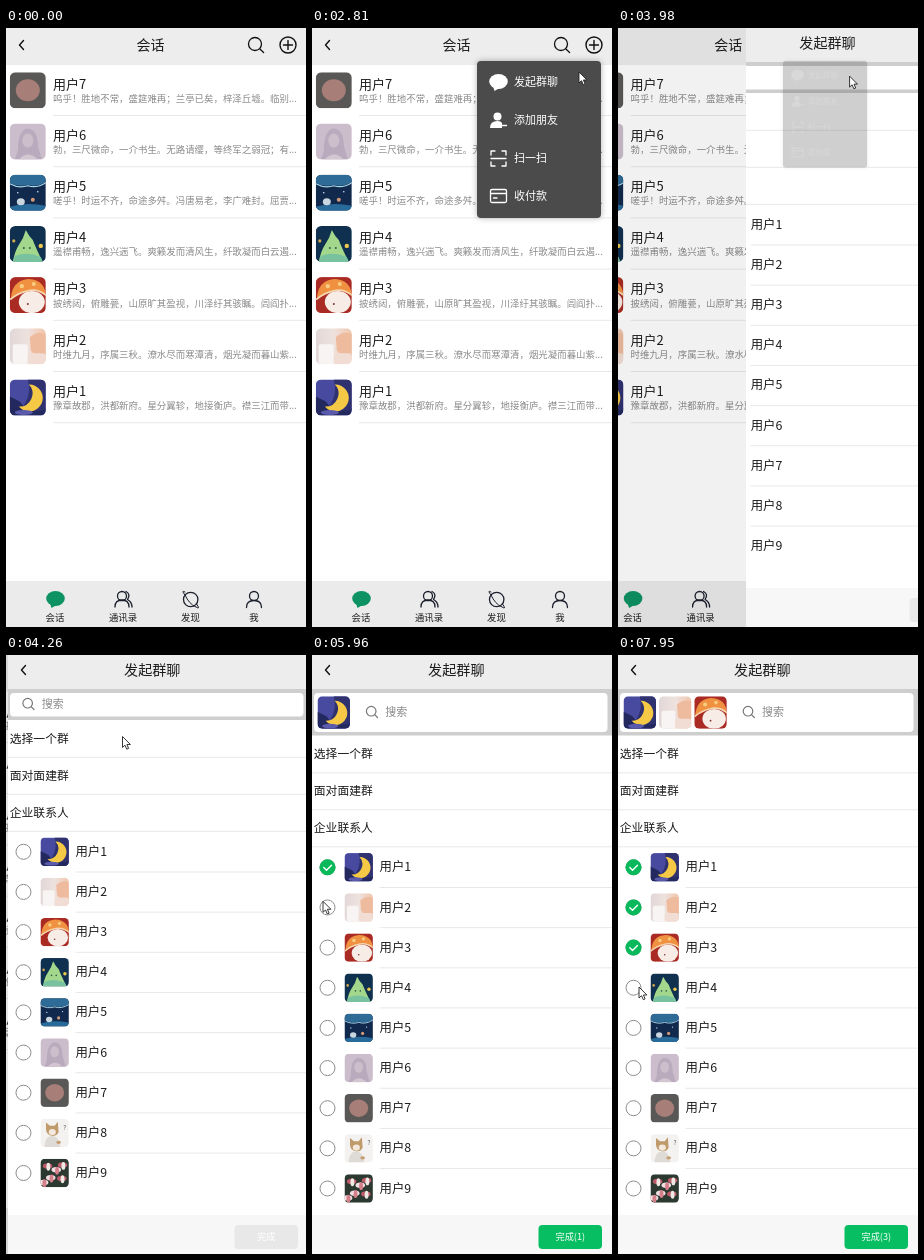
Recreate the animation shown at these times as an HTML page. Size 300x599 px, loop 8000 ms.

```html
<!DOCTYPE html>
<html lang="zh-CN">
<head>
<meta charset="utf-8">
<title>会话</title>
<style>
html, body { margin: 0; width: 100%; height: 100%; overflow: hidden; background: #fff; }
svg { display: block; width: 300px; height: 599px; }
text { font-family: "Noto Sans CJK SC", "Noto Sans CJK", "Noto Sans", sans-serif; white-space: pre; }
</style>
</head>
<body>
<svg id="stage" viewBox="0 0 300 599" width="300" height="599"></svg>
<script>
const LOOP = 8000, PITCH = 40.15;
const stage = document.getElementById('stage');
const $ = id => document.getElementById(id);

const rect = (x, y, w, h, fill, r = 0) => `<rect x="${x}" y="${y}" width="${w}" height="${h}" rx="${r}" fill="${fill}"/>`;
const circle = (x, y, r, fill) => `<circle cx="${x}" cy="${y}" r="${r}" fill="${fill}"/>`;
const oval = (x, y, a, b, fill) => `<ellipse cx="${x}" cy="${y}" rx="${a}" ry="${b}" fill="${fill}"/>`;
const shape = (d, fill) => `<path d="${d}" fill="${fill}"/>`;
const stroke = (d, color, w = 1.3) =>
  `<path d="${d}" fill="none" stroke="${color}" stroke-width="${w}" stroke-linecap="round" stroke-linejoin="round"/>`;
const rule = (x, y) => rect(x, y - .5, 300 - x, 1, '#e8e8e8');
// y is the middle of the glyphs
const label = (x, y, size, str, fill = '#1c1c1c', anchor = 'start') =>
  `<text x="${x}" y="${y + size * .375}" font-size="${size}" fill="${fill}" text-anchor="${anchor}">${str}</text>`;
const lens = (x, y, r, color, w) =>
  stroke(`M${x - r} ${y}a${r} ${r} 0 1 0 ${2 * r} 0a${r} ${r} 0 1 0 ${-2 * r} 0M${x + r * .72} ${y + r * .72}l${r * .6} ${r * .6}`, color, w);
const back = y => stroke(`M17.5 ${y - 4.5}L13.5 ${y}L17.5 ${y + 4.5}`, '#111', 1.4);
const bubble = (x, y, fill) =>
  oval(x, y, 9.3, 7.5, fill) + shape(`M${x - 6} ${y + 3}L${x - 4} ${y + 9.5}L${x + 2} ${y + 6}Z`, fill);

// Avatars on a 36 x 36 field
const avatars = [
  rect(0, 0, 36, 36, '#474a9f') + shape('M0 17L10 22L18 32L36 29V36H0Z', '#23285f') + shape('M18 0H36V30Q24 34 14 26Q22 14 18 0Z', '#30316f') +
    shape('M19 5A13.5 13.5 0 1 1 9 27A13 13 0 0 0 19 5Z', '#f5c945') + oval(14, 33, 9, 2.5, '#5a5bac'),
  rect(0, 0, 36, 36, 'url(#blush)') + rect(3, 16, 15, 20, '#f7f4f3', 2) + shape('M20 9Q28 2 36 6V27Q26 30 21 22Z', '#eebb9f') +
    rect(18, 25, 18, 11, '#f1ddd3', 3),
  rect(0, 0, 36, 36, '#a92b23') + oval(22, 25, 13, 11, '#f8ece6') +
    shape('M1 22Q2 3 19 2Q35 3 36 18Q27 11 17 14Q8 16 1 22Z', '#ef9140') + stroke('M1 22Q8 16 17 14Q27 11 36 18', '#f6d6b0', 1.8) +
    circle(12, 9, 2.2, '#f8cd80') + circle(24, 7, 2, '#f8cd80') + circle(18, 27, 1, '#7a3530'),
  rect(0, 0, 36, 36, '#10304f') + shape('M16 4Q19 10 23 14Q26 22 33 36H3Q5 25 9 19Q14 12 16 4Z', '#a3d88c') +
    shape('M5 30Q18 25 31 31L33 36H3Z', '#78c2a0') +
    circle(31, 20, 2.2, '#ecc850') + circle(4, 15, 1.6, '#d2a94b') + circle(14, 22, 1, '#315d4b') + circle(20, 22, 1, '#315d4b'),
  rect(0, 0, 36, 36, '#10294c') + shape('M0 0H36V7Q27 13 18 10Q8 13 0 8Z', '#2e6b96') + stroke('M0 9Q9 14 18 11Q27 14 36 8', '#a9d5e8', 1.2) +
    shape('M0 32Q16 27 36 31V36H0Z', '#286b9b') + oval(11, 27, 4, 3.5, '#c9d6df') + circle(23, 25, 2, '#d49a78') +
    circle(8, 18, .8, '#d7e9ff') + circle(28, 17, .8, '#d7e9ff'),
  rect(0, 0, 36, 36, '#cbbdcb') + shape('M8 28Q8 6 18 5Q28 6 28 22L32 36H5Z', '#b9aabd') + oval(18, 17, 5.5, 7, '#cdbecb') +
    shape('M9 36Q18 26 28 36Z', '#d3c6d1'),
  rect(0, 0, 36, 36, '#5a5856') + oval(18, 18, 12, 11, '#a87f78'),
  rect(0, 0, 36, 36, '#f4f2f0') + shape('M7 5L12 9H18L22 4L23 17Q21 22 15 22Q8 21 7 14Z', '#bf9a6b') + oval(15, 17, 4.5, 4, '#f3e8db') +
    shape('M5 36Q6 21 15 22Q24 22 25 36Z', '#dedad6') + label(29, 11, 8, '?', '#555') + oval(23, 30, 3, 2, '#c79e72'),
  rect(0, 0, 36, 36, '#2c3930') + [[9, 9], [20, 14], [28, 8], [13, 24], [27, 25], [4, 30]].map(([x, y], i) =>
    oval(x, y, 6, 3.5, i % 2 ? '#f1dfe2' : '#ba5968') + oval(x + 1, y + 1, 2.5, 5, i % 2 ? '#d57f8b' : '#eee9e4')).join('')
];
const avatar = (n, x, y, size) => `<use href="#av${n}" transform="translate(${x} ${y}) scale(${size / 36})"/>`;

const previews = [
  '豫章故郡，洪都新府。星分翼轸，地接衡庐。襟三江而带',
  '时维九月，序属三秋。潦水尽而寒潭清，烟光凝而暮山紫',
  '披绣闼，俯雕甍，山原旷其盈视，川泽纡其骇瞩。闾阎扑',
  '遥襟甫畅，逸兴遄飞。爽籁发而清风生，纤歌凝而白云遏',
  '嗟乎！时运不齐，命途多舛。冯唐易老，李广难封。屈贾',
  '勃，三尺微命，一介书生。无路请缨，等终军之弱冠；有',
  '呜乎！胜地不常，盛筵难再；兰亭已矣，梓泽丘墟。临别'
];

function chatPage() {
  let s = rect(0, 0, 300, 599, '#fff') + rect(0, 0, 300, 37, '#ededed') + back(17) +
    label(144.6, 16.8, 14, '会话', '#1c1c1c', 'middle') + lens(249, 16, 6.5, '#111', 1.3) +
    `<circle cx="282" cy="17" r="8" fill="none" stroke="#111" stroke-width="1.4"/>` + stroke('M277.500 17H286.500M282 12.500V21.500', '#111', 1.4);
  for (let i = 0; i < 7; i++) {
    const n = 7 - i, y = 51.2 * i;
    s += avatar(n, 3.8, 44.3 + y, 36) + label(47, 55.7 + y, 13, '用户' + n) +
      label(47, 70.2 + y, 9.45, previews[n - 1] + '...', '#8a8a8a') + rule(47, 87.5 + y);
  }
  s += rect(0, 553, 300, 46, '#ebebeb') + bubble(49.5, 570.5, '#0d9263');
  s += stroke('M109 579Q109 572 116 572Q123 572 123 579M111.500 568a4.500 4.500 0 1 0 9 0a4.500 4.500 0 1 0 -9 0M120 563.500Q125 566 121.500 571.500Q126 574 126 579', '#1b1f2b');
  s += stroke('M177.500 571.500a7.200 7.200 0 1 0 14.400 0a7.200 7.200 0 1 0 -14.400 0', '#1b1f2b') +
    stroke('M179 567Q174.500 561.500 179 564M190.500 576Q195 582 190 579Q183 576 179 567', '#1b1f2b', 1);
  s += stroke('M240.500 579.500Q240.500 572.500 248 572.500Q255.500 572.500 255.500 579.500M243.500 568a4.500 4.500 0 1 0 9 0a4.500 4.500 0 1 0 -9 0', '#1b1f2b');
  [[49, '会话'], [117, '通讯录'], [184.5, '发现'], [248, '我']].forEach(([x, t]) => s += label(x, 589.5, 9.4, t, '#1c1c1c', 'middle'));
  return s + `<rect id="dim" width="300" height="599" opacity="0"/>`;
}

function groupPage() {
  let list = '';
  ['选择一个群', '面对面建群', '企业联系人'].forEach((t, i) =>
    list += label(1.8, 83.3 + 37 * i, 11.8, t) + rule(0, 102.3 + 37 * i));
  for (let i = 0; i < 9; i++) {
    const y = 196.8 + PITCH * i;
    list += `<circle cx="15.500" cy="${y}" r="7.500" fill="#fff" stroke="#8c8c8c"/>`;
    if (i < 3) list += `<g id="tick${i}">${circle(15.5, y, 8, '#07b95b')}${stroke(`M11.800 ${y + .2}l2.700 2.700l5 -5`, '#fff', 1.4)}</g>`;
    list += avatar(i + 1, 32.5, y - 14.2, 28.4) + label(67.5, y - .6, 12.4, '用户' + (i + 1));
    if (i < 8) list += rule(67.5, y + 20.2);
  }
  return rect(0, 0, 300, 599, '#fff') + rect(0, 0, 300, 34, '#ededed') + back(15) +
    label(144.3, 14.8, 14.1, '发起群聊', '#1c1c1c', 'middle') +
    `<rect id="band" y="34" width="300" fill="#cecece"/><rect id="field" x="2" y="38" width="293.500" rx="4" fill="#fff"/>` +
    [0, 1, 2].map(i => `<g id="pick${i}">${avatar(i + 1, 5.5 + 35.4 * i, 41.3, 32.5)}</g>`).join('') +
    `<g id="hint">${lens(-.8, -.8, 4.8, '#777', 1.2)}${label(13.3, 0, 11, '搜索', '#8a8a8a')}</g>` +
    `<g id="list">${list}</g>` + rect(0, 560, 300, 39, '#f7f7f7') +
    `<rect id="btn" x="226.500" y="570" width="63.500" height="24" rx="4"/>` +
    `<text id="done" x="258.300" y="585" font-size="9.200" fill="#fff" text-anchor="middle"></text>`;
}

function menuPanel() {
  const w = '#fff';
  const items = bubble(21.5, 20.5, w) +
    circle(20.5, 55.5, 4, w) + shape('M13 67Q13 60 20.500 60Q24 60 25 62V67Z', w) + stroke('M24 64.500H29.500', w, 1.4) +
    stroke('M14 94V90H18M25 90H29V94M29 101V105H25M18 105H14V101M14 97.500H29', w) +
    stroke('M15 128.500H28Q29.500 128.500 29.500 130V140Q29.500 141.500 28 141.500H15Q13.500 141.500 13.500 140V130Q13.500 128.500 15 128.500ZM13.500 132.500H29.500M16.500 137H20', w) +
    ['发起群聊', '添加朋友', '扫一扫', '收付款'].map((t, i) => label(37, 21.2 + 38 * i, 11, t, w)).join('');
  return `<g filter="url(#soft)">${rect(0, 0, 124, 157, '#000', 4)}</g>` + rect(0, 0, 124, 157, '#4b4b4b', 4) +
    `<g id="items">${items}</g>`;
}

stage.innerHTML = `<defs>
  <linearGradient id="blush"><stop offset="0" stop-color="#e2d7d8"/><stop offset=".5" stop-color="#eee2de"/><stop offset="1" stop-color="#f0c5ac"/></linearGradient>
  <filter id="soft" x="-20%" y="-20%" width="140%" height="140%"><feGaussianBlur stdDeviation="3"/><feComponentTransfer><feFuncA type="linear" slope=".3"/></feComponentTransfer></filter>
  <clipPath id="round"><rect width="36" height="36" rx="5.500"/></clipPath>
  <clipPath id="wipe"><rect id="edge" width="600" height="599"/></clipPath>
  ${avatars.map((a, i) => `<g id="av${i + 1}" clip-path="url(#round)">${a}</g>`).join('')}
</defs>
<g id="chats">${chatPage()}</g>
<g id="cover" clip-path="url(#wipe)"><g id="group">${groupPage()}</g></g>
<g id="menu">${menuPanel()}</g>
<path id="cursor" d="M0 0V11L2.500 8.700L4.300 12.700L6.100 11.900L4.400 8H7.900Z" fill="#fff" stroke="#222" stroke-width=".9" stroke-linejoin="round"/>`;

// time, x, y
const track = [
  [350, 230, 470], [420, 170, 300], [490, 90, 110], [560, 33, 3], [760, 32, 2], [1000, 14, 12], [1250, 17, 32],
  [1510, 31, 50], [1580, 36, 52], [1720, 155, 55], [1860, 262, 36], [2000, 273, 22], [2280, 276, 15],
  [2650, 276, 15], [2900, 262, 60], [3160, 200, 149], [3230, 208, 140], [3330, 250, 85], [3440, 233, 49],
  [3640, 232, 48], [3980, 232, 48], [4260, 117, 81], [4470, 14, 185], [4540, 5, 193], [4800, 5, 193], [5140, 12, 196],
  [5480, 12, 196], [5900, 11, 246], [6110, 11, 247], [6300, 11, 247], [6910, 14, 277], [6980, 14, 278],
  [7260, 15, 294], [7600, 15, 295], [7950, 21, 332]
];
function pointer(t) {
  let i = 0;
  while (i < track.length - 1 && track[i + 1][0] <= t) i++;
  const a = track[i], b = track[i + 1] || a;
  const k = b === a ? 0 : (t - a[0]) / (b[0] - a[0]);
  return [a[1] + (b[1] - a[1]) * k, a[2] + (b[2] - a[2]) * k];
}

const clamp = (v, lo = 0, hi = 1) => Math.min(hi, Math.max(lo, v));
const set = (id, attrs) => { for (const k in attrs) $(id).setAttribute(k, attrs[k]); };
const show = (id, on) => set(id, { display: on ? 'inline' : 'none' });
const slide = t => t < 3840 ? 300 : t > 4540 ? 0 : Math.min(300, 66 * Math.exp((3980 - t) / 80));

function draw(t) {
  // the visible edge trails the page, then closes fully
  const x = slide(t), edge = t < 3840 ? 300 : Math.max(0, slide(t - 57) - 5), moved = 1 - edge / 300;
  set('chats', { transform: `translate(${-60 * moved} 0)` });
  set('dim', { opacity: .095 * moved });
  show('cover', x < 300);
  set('edge', { x: edge });
  set('group', { transform: `translate(${x} 0)` });

  const open = clamp((t - 2410) / 240), shut = clamp((t - 3840) / 190);
  const ease = 1 - (1 - open) ** 3;
  const size = (.5 + .5 * ease) * (1 - .434 * shut);
  show('menu', open > 0 && shut < 1);
  set('menu', { transform: `translate(165 33) scale(${size})`, opacity: ease * (1 - shut) });
  set('items', { opacity: clamp(1 - 1.1 * shut) });

  const count = [5340, 6160, 7460].filter(s => t >= s).length;
  const drop = count ? 15.5 : 0;
  set('band', { height: 31 + drop });
  set('field', { height: 23.5 + drop });
  set('list', { transform: `translate(0 ${drop})` });
  set('hint', { transform: `translate(${count ? 60 + 35.4 * (count - 1) : 20.5} ${count ? 57 : 49})` });
  for (let i = 0; i < 3; i++) {
    show('tick' + i, i < count);
    show('pick' + i, i < count);
  }
  set('btn', { fill: count ? '#07bf62' : '#e8e8e8' });
  $('done').textContent = count ? `完成(${count})` : '完成';

  const [cx, cy] = pointer(t);
  show('cursor', t >= 350);
  set('cursor', { transform: `translate(${cx} ${cy})` });
}

const start = performance.now();
function tick() {
  draw((performance.now() - start) % LOOP);
  requestAnimationFrame(tick);
}
draw(0);
requestAnimationFrame(tick);
</script>
</body>
</html>
```
